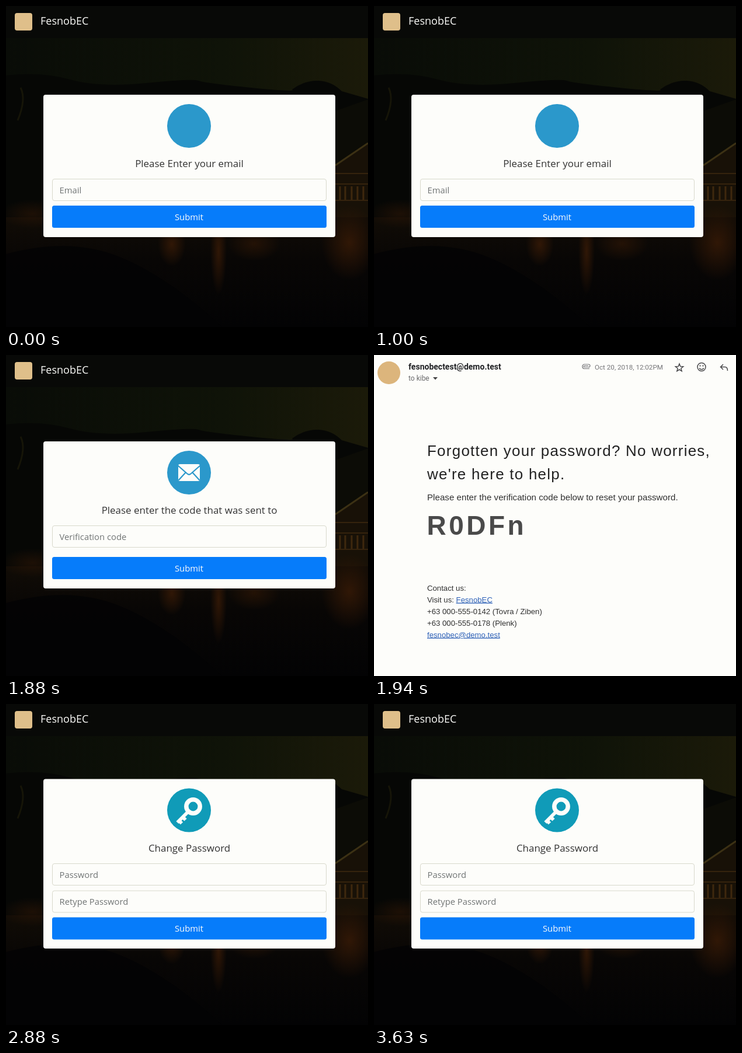
Recreate the animation shown at these times as an HTML page. Size 620 px wide and 550 px high, loop 3.69 s.

```html
<!DOCTYPE html>
<html lang="en">
<head>
<meta charset="utf-8">
<title>Password reset</title>
<style>
  html, body { margin: 0; width: 100%; height: 100%; overflow: hidden; background: #040404; }
  svg { display: block; width: 620px; height: 550px; }
  .ui { font-family: "Open Sans", "Noto Sans", sans-serif; }
  .mail { font-family: "Liberation Sans", Arial, sans-serif; }
  .head { font-family: Roboto, Arial, sans-serif; }
  .mid { text-anchor: middle; }
  .paper { fill: #fdfdfa; }
  .link { fill: #2f62b8; text-decoration: underline; }
</style>
</head>
<body>
<svg id="stage" viewBox="0 0 620 550" xmlns="http://www.w3.org/2000/svg">
  <defs>
    <linearGradient id="sky">
      <stop offset="0" stop-color="#090c07"/>
      <stop offset=".6" stop-color="#0f1308"/>
      <stop offset="1" stop-color="#1b1a09"/>
    </linearGradient>
    <linearGradient id="water" x2="0" y2="1">
      <stop offset="0" stop-color="#110c06"/>
      <stop offset=".4" stop-color="#080605"/>
      <stop offset="1" stop-color="#030304"/>
    </linearGradient>
    <radialGradient id="glow">
      <stop offset="0" stop-color="#301706"/>
      <stop offset="1" stop-color="#301706" stop-opacity="0"/>
    </radialGradient>
  </defs>

  <g id="site" class="ui">
    <rect width="620" height="550" fill="#050504"/>
    <rect y="55" width="620" height="110" fill="url(#sky)"/>
    <path d="M0 119Q60 112 110 126T240 132 330 128 420 140 490 143Q512 127 535 128T575 146L620 159V370H0Z" fill="#060705"/>
    <path d="M564 180L620 160V370H564Z" fill="#0c0c06"/>
    <path d="M564 272L620 236V362H564Z" fill="#181107"/>
    <path d="M564 273L620 235" stroke="#3c3114" stroke-width="3"/>
    <path d="M564 287H620M564 305H620M564 333H620" stroke="#35230d" stroke-width="2"/>
    <path d="M572 309V332M581 309V332M592 309V332M602 309V332M612 309V332" stroke="#3e280e" stroke-width="3"/>
    <path d="M25 140Q35 160 20 196" stroke="#161508" stroke-width="3" fill="none"/>
    <rect y="362" width="620" height="188" fill="url(#water)"/>
    <ellipse cx="45" cy="356" rx="55" ry="25" fill="url(#glow)" opacity=".55"/>
    <ellipse cx="284" cy="408" rx="24" ry="38" fill="url(#glow)"/>
    <ellipse cx="364" cy="420" rx="14" ry="75" fill="url(#glow)"/>
    <ellipse cx="425" cy="407" rx="45" ry="30" fill="url(#glow)" opacity=".65"/>
    <ellipse cx="588" cy="405" rx="48" ry="65" fill="url(#glow)"/>
    <path d="M0 425Q110 395 195 430T370 550H0Z" fill="#030304" opacity=".8"/>
    <rect width="620" height="55" fill="#080907"/>
    <rect x="15" y="12" width="30" height="30" rx="4" fill="#dfbf8a"/>
    <text x="59" y="32" font-size="18" fill="#fdfdfa">FesnobEC</text>
  </g>

  <g id="mail" class="mail" fill="#303030">
    <rect class="paper" width="620" height="550"/>
    <circle cx="25.5" cy="30.5" r="19.5" fill="#dcb57c"/>
    <g class="head">
      <text x="59" y="25" font-size="14" font-weight="700" fill="#202124">fesnobectest@demo.test</text>
      <text x="59" y="44" font-size="12" fill="#6a6a6c">to kibe</text>
      <path d="M101 38H109L105 42.5Z" fill="#444"/>
      <text x="378" y="24.5" font-size="11.65" fill="#757578">Oct 20, 2018, 12:02PM</text>
    </g>
    <g fill="none" stroke="#4a4a4c" stroke-width="1.5">
      <path d="M369 23.5H359.5A4 4 0 0 1 359.5 16H367.5A2.5 2.5 0 0 1 367.5 21H360.5A1 1 0 0 1 360.5 18.5H367" stroke="#757578" stroke-width="1.2"/>
      <path id="star"/>
      <circle cx="561" cy="20.5" r="7"/>
      <path d="M557 22.5Q561 27 565 22.5"/>
      <path d="M598 16L593.5 20.5 598 25M594 20.5H601Q605.5 20.5 605.5 27"/>
    </g>
    <circle cx="558.5" cy="18.5" r="1.1"/>
    <circle cx="563.5" cy="18.5" r="1.1"/>
    <g font-size="26" letter-spacing="1.23" fill="#222">
      <text x="91" y="173">Forgotten your password? No worries,</text>
      <text x="91" y="213">we're here to help.</text>
    </g>
    <text x="91" y="249" font-size="15.17">Please enter the verification code below to reset your password.</text>
    <text x="90.5" y="308" font-size="46" font-weight="700" letter-spacing="4.5" fill="#4a4a4a">R0DFn</text>
    <g font-size="13.2">
      <text x="91" y="403.5">Contact us:</text>
      <text x="91" y="423.5">Visit us: <tspan class="link">FesnobEC</tspan></text>
      <text x="91" y="443.5">+63 000-555-0142 (Tovra / Ziben)</text>
      <text x="91" y="463.5">+63 000-555-0178 (Plenk)</text>
      <text x="91" y="483.5" class="link">fesnobec@demo.test</text>
    </g>
  </g>
</svg>

<script>
const LOOP = 3690;
const stage = document.getElementById('stage');
const site = document.getElementById('site');
const mail = document.getElementById('mail');

const envelope = `
  <rect class="paper" x="-18.5" y="-14.5" width="37" height="29" rx="3"/>
  <path d="M-19 -12L-3 2Q0 4.5 3 2L19 -12M-18 13L-6 0M18 13L6 0"
    fill="none" stroke="#2b98cb" stroke-width="2.2"/>`;
const key = `
  <g fill="none" stroke="#fdfdfa">
    <circle cx="7" cy="-6.5" r="11.7" stroke-width="7.5"/>
    <path d="M-2 3L-20 21M-18.5 16.5L-12.5 22.5M-12 10.5L-6 16.5" stroke-width="6"/>
  </g>`;

const forms = {
  email: { top: 152, bottom: 396, title: 'Please Enter your email',
    fields: [['Email', 296]], button: 342, color: '#2b98cb', icon: '' },
  code: { top: 148, bottom: 400, title: 'Please enter the code that was sent to',
    fields: [['Verification code', 292]], button: 346, color: '#2b98cb', icon: envelope },
  password: { top: 128.5, bottom: 419, title: 'Change Password',
    fields: [['Password', 273], ['Retype Password', 319.5]], button: 365.5, color: '#109bb8', icon: key }
};

const field = ([label, y]) => `
  <rect class="paper" x="79.5" y="${y + .5}" width="469" height="37" rx="3.5" stroke="#d8d9cc"/>
  <text x="91.5" y="${y + 24.5}" font-size="14.8" fill="#717575">${label}</text>`;

function card(f) {
  const g = document.createElementNS('http://www.w3.org/2000/svg', 'g');
  g.setAttribute('class', 'ui');
  g.innerHTML = `
    <rect class="paper" x="64" y="${f.top}" width="500" height="${f.bottom - f.top}" rx="4"/>
    <g transform="translate(313.5 ${f.top + 53.5})">
      <circle r="37.5" fill="${f.color}"/>${f.icon}
    </g>
    <text class="mid" x="314" y="${f.top + 124}" font-size="16.95" fill="#333">${f.title}</text>
    ${f.fields.map(field).join('')}
    <rect x="79" y="${f.button}" width="470" height="38" rx="3.5" fill="#067cfa"/>
    <text class="mid paper" x="313.5" y="${f.button + 24.5}" font-size="14.8">Submit</text>`;
  return stage.appendChild(g);
}

const star = Array.from({ length: 10 }, (_, i) => {
  const r = i % 2 ? 3 : 7, a = (i * 36 - 90) * Math.PI / 180;
  return (523 + r * Math.cos(a)).toFixed(2) + ' ' + (22 + r * Math.sin(a)).toFixed(2);
});
document.getElementById('star').setAttribute('d', 'M' + star.join('L') + 'Z');

// Each scene holds until the next hard cut.
const scenes = [
  [0, [site, card(forms.email)]],
  [1060, [site, card(forms.code)]],
  [1940, [mail]],
  [2880, [site, card(forms.password)]]
];
const layers = new Set(scenes.flatMap(([, parts]) => parts));

function draw() {
  const t = performance.now() % LOOP;
  const [, shown] = scenes.findLast(([start]) => t >= start);
  layers.forEach(el => { el.style.display = shown.includes(el) ? '' : 'none'; });
  requestAnimationFrame(draw);
}
draw();
</script>
</body>
</html>
```
